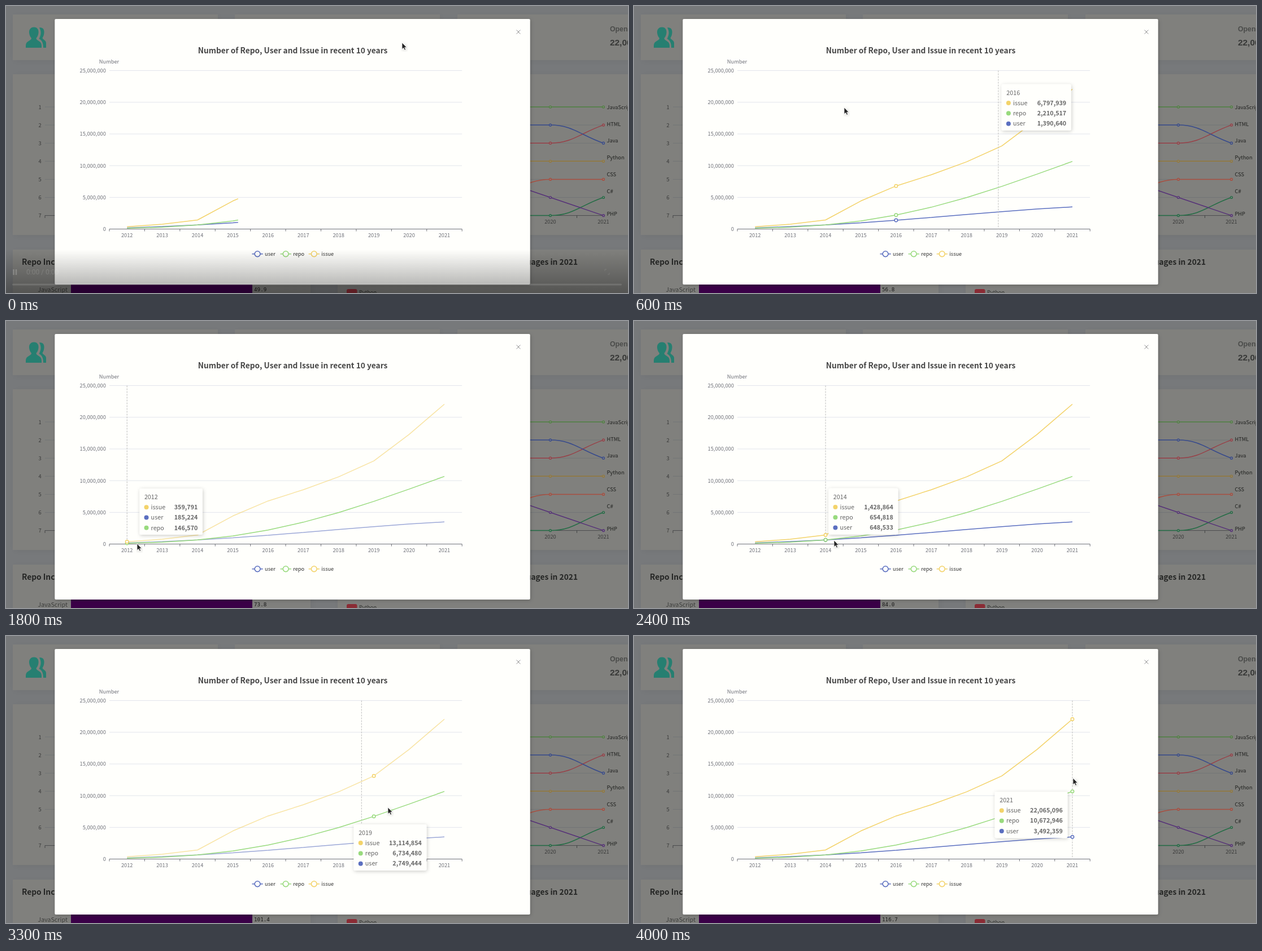
An HTML page for the animation above (4.1 s loop, 1101x509 px).

```html
<!DOCTYPE html>
<html lang="en">
<head>
<meta charset="utf-8">
<title>Repo, user and issue chart</title>
<style>
html, body { margin: 0; width: 100%; height: 100%; overflow: hidden; background: #77797b; }
svg { display: block; width: 1101px; height: 509px; font-family: "Noto Sans CJK SC", "Noto Sans CJK JP", "Noto Sans CJK", "Noto Sans", sans-serif; }
</style>
</head>
<body>
<svg id="stage" viewBox="0 0 1101 509" xmlns="http://www.w3.org/2000/svg">
  <defs>
    <filter id="soft" x="-20%" y="-20%" width="140%" height="140%">
      <feDropShadow dx="1" dy="1.5" stdDeviation="3" flood-color="#000" flood-opacity=".2"/>
    </filter>
    <filter id="cardShade" x="-10%" y="-20%" width="120%" height="140%">
      <feDropShadow dx="2" dy="2" stdDeviation="6" flood-color="#000" flood-opacity=".05"/>
    </filter>
    <linearGradient id="shade" x2="0" y2="1">
      <stop offset="0" stop-opacity="0"/>
      <stop offset="1" stop-opacity=".34"/>
    </linearGradient>
    <clipPath id="reveal"><rect id="revealBox" x="183" y="100" height="310"/></clipPath>
  </defs>
  <g id="page"></g>
  <g id="modal"></g>
  <g id="lines" clip-path="url(#reveal)"></g>
  <line id="pointer" y1="114.5" y2="395.6" stroke="#bcbcbc" stroke-dasharray="3 2"/>
  <g id="markers"></g>
  <g id="tip"></g>
  <g id="controls">
    <rect y="432" width="1101" height="77" fill="url(#shade)"/>
    <path d="M13.500 467v10M18 467v10" stroke="#fff" stroke-width="2.5" opacity=".2"/>
    <text x="36" y="476" font-size="12" fill="#fff" opacity=".15" font-family="Roboto, sans-serif">0:00 / 0:00</text>
    <path d="M1060 470v-3h3M1068 473v3h-3" stroke="#fff" fill="none" opacity=".1"/>
    <rect x="11" y="492.5" width="1079" height="3" rx="1.5" fill="#fff" opacity=".13"/>
  </g>
  <g id="cursor">
    <path d="M0 0V11.6L2.7 9.2L4.6 13.2L6.5 12.3L4.7 8.4H8.2Z" fill="#222" stroke="#fff" stroke-width=".7" filter="url(#soft)"/>
  </g>
</svg>
<script>
const NS = 'http://www.w3.org/2000/svg';
const LOOP = 4100, STEP = 100;
const TOP = 114.5, BOTTOM = 395.6, LEFT = 183, PITCH = 62.42;
const $ = id => document.getElementById(id);

const set = (node, attrs) => { for (const key in attrs) node.setAttribute(key, attrs[key]); };
function add(parent, tag, attrs, content) {
  const node = document.createElementNS(NS, tag);
  set(node, attrs);
  if (content !== undefined) node.textContent = content;
  return parent.appendChild(node);
}
const label = (parent, x, y, content, size, fill, more) =>
  add(parent, 'text', { x, y, 'font-size': size, fill, ...more }, content);
const middle = { 'text-anchor': 'middle' }, end = { 'text-anchor': 'end' };
const bold = { 'font-weight': 700 };
const format = n => n.toLocaleString('en-US');
const clamp = (v, lo, hi) => Math.max(lo, Math.min(hi, v));

// Mean of fn over the time span that ends at t; used as easing.
function mean(fn, t, span) {
  const samples = 20;
  let sum = 0;
  for (let i = 0; i < samples; i++) sum += fn(t - span * (i + .5) / samples);
  return sum / samples;
}

// Polynomial through the values known for these years after 2012.
const knownYears = [0, 2, 4, 7, 9];
const smooth = values => Array.from({ length: 10 }, (_, x) =>
  Math.round(values.reduce((sum, v, i) => sum + knownYears.reduce(
    (p, year, j) => j === i ? p : p * (x - year) / (knownYears[i] - year), v), 0)));

const series = [
  { name: 'user', color: '#5b6fc0', data: smooth([185224, 648533, 1390640, 2749444, 3492359]) },
  { name: 'repo', color: '#98da7d', data: smooth([146570, 654818, 2210517, 6734480, 10672946]) },
  { name: 'issue', color: '#f3d36a', data: [359791, 760000, 1428864, 4430000, 6797939, 8570000, 10600000, 13114854, 17300000, 22065096] }
];
const xAt = i => LEFT + PITCH * (i + .5);
const yAt = v => BOTTOM - v * 56.22 / 5e6;

// Main stops of the mouse: time, x, y.
const stops = [
  [0, 701, 65], [460, 695, 122], [600, 372, 180], [700, 197, 378], [1000, 183, 415],
  [1200, 209, 412], [1500, 222, 395], [1800, 232, 395], [2200, 345, 390], [2400, 354, 389],
  [3300, 676, 304], [3650, 754, 275], [4000, 777, 252]
];
function mouse(t) {
  t = Math.max(0, t);
  const i = clamp(stops.findIndex(s => s[0] >= t), 1, stops.length - 1);
  const [t0, x0, y0] = stops[i - 1], [t1, x1, y1] = stops[i];
  const k = (t - t0) / (t1 - t0);
  return { x: x0 + (x1 - x0) * k, y: y0 + (y1 - y0) * k };
}
const hovering = t => { const { y } = mouse(t); return y > TOP && y < BOTTOM ? 1 : 0; };
const activeIndex = t => clamp(Math.floor((mouse(t - 50).x - LEFT) / PITCH), 0, 9);
const tipWidth = index => 71.5 + 5.75 * format(series[2].data[index]).length;

// The tooltip stands beside the mouse and flips over where it has no room.
function tipX(t) {
  const { x } = mouse(t), width = tipWidth(activeIndex(t)), gap = 11;
  return x + gap + width > 893 ? x - gap - width : Math.max(x, 195) + gap;
}
function tipY(t) {
  const y = clamp(mouse(t).y, TOP, 390), gap = 11, height = 82;
  return y + gap + height > 450 ? y - gap - height : y + gap;
}

function buildRanking(g) {
  const rankY = rank => 146.9 + 32.1 * rank;
  const xs = [869.5, 963.5, 1057.5];
  for (let rank = 1; rank <= 7; rank++) {
    const y = rankY(rank);
    label(g, 60, y + 3.5, rank, 9.25, '#383939', middle);
    add(g, 'path', { d: `M69 ${y}H1058`, stroke: rank < 7 ? '#717476' : '#4b4c4e' });
  }
  add(g, 'path', { d: 'M69 371.500v4.500M1010.500 371.500v4.500', stroke: '#424345' });
  label(g, xs[1], 385.5, 2020, 9.25, '#383939', middle);
  label(g, xs[2], 385.5, 2021, 9.25, '#383939', middle);

  const languages = [
    ['JavaScript', '#4f8240', [1, 1, 1]],
    ['HTML', '#983f47', [3, 3, 2]],
    ['Java', '#374a8c', [2, 2, 3]],
    ['Python', '#94793a', [4, 4, 4]],
    ['CSS', '#a84e40', [6, 5, 5]],
    ['C#', '#236c45', [7, 7, 6]],
    ['PHP', '#553078', [5, 6, 7], 11]
  ];
  languages.forEach(([name, stroke, ranks, shift = 0], i) => {
    const [a, b, c] = ranks.map(rankY);
    const turn = (b - a) * (c - b) > 0 ? (c - a) / 2 : 0;
    const bend = (x, y0, y1, m0, m1) =>
      `C${x + 40} ${y0 + .42 * m0} ${x + 54} ${y1 - .42 * m1} ${x + 94} ${y1}`;
    add(g, 'path', {
      d: `M${xs[0]} ${a}${bend(xs[0], a, b, b - a, turn)}${bend(xs[1], b, c, turn, c - b)}`,
      stroke, fill: 'none', 'stroke-width': 1.5
    });
    [b, c].forEach((cy, j) =>
      add(g, 'circle', { cx: xs[j + 1], cy, r: 1.9, fill: '#858582', stroke, 'stroke-width': 1.4 }));
    label(g, 1063.5, 183 + 29.7 * i + shift, name, 9.25, '#1f201f');
  });
}

function buildPage() {
  const g = $('page');
  add(g, 'rect', { width: 1101, height: 509, fill: '#77797b' });
  const card = (x, y, width, height) =>
    add(g, 'rect', { x, y, width, height, fill: '#80807d', filter: 'url(#cardShade)' });
  [12, 405, 799].forEach(x => card(x, 15, 363, 81));
  [121, 432].forEach(y => { card(12, y, 527, 285); card(587, y, 540, 285); });

  const teal = '#267f71';
  add(g, 'path', { d: 'M59 38.500c6-1 9 3 8.500 9c-.3 4-1.500 7-3 9c0 3 6.500 4 6.500 9v8.500h-5c0-8-2-13-7.500-16c3.500-6 4.500-13 .5-19.500Z', fill: teal });
  add(g, 'path', { d: 'M49.500 37.500c6 0 8.500 4.500 8 10c-.4 4-2 7.500-4 9.500c0 5 9.500 4.500 9.500 13v4H35v-4c0-8.500 10-8 10-13c-2-2-3.600-5.500-4-9.500c-.5-5.500 2.500-10 8.500-10Z', fill: teal });

  const arial = { ...bold, 'font-family': '"Liberation Sans", Arial, sans-serif' };
  label(g, 1069, 44.5, 'Open', 12.3, '#4a4b4a', arial);
  label(g, 1069, 69.5, '22,000', 15.4, '#373837', arial);

  buildRanking(g);

  label(g, 28, 459, 'Repo Increment', 13.75, '#242524', bold);
  label(g, 1012, 459, 'Top Languages in 2021', 13.75, '#242524', { ...bold, ...end });
  label(g, 109, 506.8, 'JavaScript', 10.78, '#3c3d3c', end);
  add(g, 'rect', { x: 115, y: 480, width: 321, height: 29, fill: '#3a0047' });
  label(g, 439, 506, '', 9.25, '#181818', { id: 'barText', 'font-family': '"DejaVu Sans Mono", monospace' });
  add(g, 'rect', { x: 603, y: 502, width: 18.5, height: 12, rx: 3, fill: '#8a2c35' });
  label(g, 625, 511, 'Python', 9.25, '#2f302f');
}

function buildModal() {
  const g = $('modal'), gray = '#6e7079';
  add(g, 'rect', { x: 86.3, y: 23, width: 841.4, height: 471, rx: 2, fill: '#fffffc', filter: 'url(#soft)' });
  add(g, 'path', { d: 'M903.500 42.500l7 7M910.500 42.500l-7 7', stroke: '#929292' });
  label(g, 507.5, 84.2, 'Number of Repo, User and Issue in recent 10 years', 13.73, '#464646', { ...bold, ...middle });
  label(g, 182.5, 102, 'Number', 9.25, gray, middle);
  for (let v = 0; v <= 25e6; v += 5e6) {
    add(g, 'path', { d: `M${LEFT} ${yAt(v)}h${PITCH * 10}`, stroke: v ? '#e2e5ec' : gray });
    label(g, 176.8, yAt(v) + 3.4, format(v), 9.25, gray, end);
  }
  for (let i = 0; i <= 10; i++) {
    add(g, 'path', { d: `M${xAt(i - .5)} ${BOTTOM}v4`, stroke: gray });
    if (i < 10) label(g, xAt(i), 410.2, 2012 + i, 9.25, gray, middle);
  }
  series.forEach((s, i) => {
    const x = 445.1 + 50.1 * i, stroke = s.color;
    add(g, 'path', { d: `M${x - 9.6} 439.700h19.200`, stroke, 'stroke-width': 1.55 });
    add(g, 'circle', { cx: x, cy: 439.7, r: 4.9, fill: '#fffffc', stroke, 'stroke-width': 1.55 });
    label(g, x + 13, 443.2, s.name, 9.25, '#333');
    s.line = add($('lines'), 'polyline', {
      points: s.data.map((v, j) => xAt(j) + ',' + yAt(v)).join(' '),
      fill: 'none', stroke, 'stroke-width': 1.5, 'stroke-linejoin': 'bevel'
    });
    s.marker = add($('markers'), 'circle', { r: 2.7, fill: '#fffffc', stroke, 'stroke-width': 1.5 });
  });
}

const tip = {};
function buildTip() {
  const g = $('tip'), size = 10.78, gray = '#666';
  tip.box = add(g, 'rect', { height: 82, rx: 3, fill: '#fffffc', filter: 'url(#soft)' });
  tip.year = label(g, 8.7, 18.8, '', size, gray);
  tip.rows = series.map((_, i) => {
    const y = 33.2 + 18.3 * i;
    return {
      dot: add(g, 'circle', { cx: 12.3, cy: y, r: 4 }),
      name: label(g, 20.4, y + 3.8, '', size, gray),
      value: label(g, 0, y + 3.8, '', size, gray, { 'font-weight': 900, ...end })
    };
  });
}

function renderTip(t, index) {
  const x = mean(tipX, t, 400), y = mean(tipY, t, 400), width = tipWidth(index);
  set($('tip'), { transform: `translate(${x} ${y})`, opacity: mean(hovering, t, 200) });
  set(tip.box, { width });
  tip.year.textContent = 2012 + index;
  const sorted = [...series].sort((a, b) => b.data[index] - a.data[index]);
  tip.rows.forEach((row, i) => {
    set(row.dot, { fill: sorted[i].color });
    row.name.textContent = sorted[i].name;
    row.value.textContent = format(sorted[i].data[index]);
    set(row.value, { x: width - 8.6 });
  });
}

function render(t) {
  const index = activeIndex(t), { x, y } = mouse(t), seconds = t / 1000;
  set($('cursor'), { transform: `translate(${x} ${y})` });
  set($('revealBox'), { width: Math.min(635, 228 + .68 * t) });
  set($('controls'), { opacity: Math.max(0, 1 - t / 300) });
  $('barText').textContent = (49.9 + 10.5 * seconds + 1.55 * seconds ** 2).toFixed(1);

  const px = mean(s => xAt(activeIndex(s)), t, 160);
  set($('pointer'), { x1: px, x2: px, opacity: hovering(t) });
  set($('markers'), { opacity: hovering(t) });

  // The repo line takes the focus twice while the mouse crosses it.
  const focus = [1800, 3300].reduce((sum, at) => sum + Math.max(0, 1 - Math.abs(t - at) / 200), 0);
  series.forEach(s => {
    set(s.marker, { cx: xAt(index), cy: yAt(s.data[index]) });
    set(s.line, { opacity: s.name === 'repo' ? 1 : 1 - .4 * focus });
  });
  renderTip(t, index);
}

buildPage();
buildModal();
buildTip();
const start = performance.now();
function tick() {
  const t = (performance.now() - start) % LOOP;
  render(Math.floor(t / STEP) * STEP);
  requestAnimationFrame(tick);
}
render(0);
requestAnimationFrame(tick);
</script>
</body>
</html>
```
